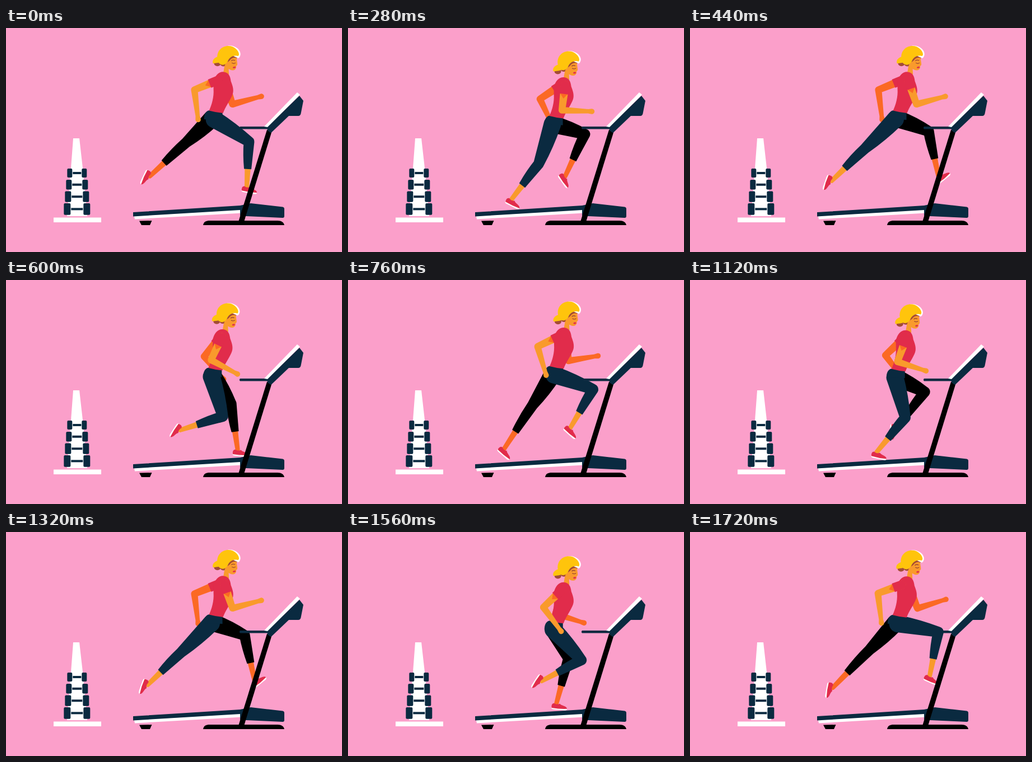
Write an HTML page that moves like this. It is 600x400 px and loops after 1760 ms.

```html
<!DOCTYPE html>
<html lang="en">
<head>
<meta charset="utf-8">
<title>Treadmill run</title>
<style>
  html, body { margin: 0; width: 100%; height: 100%; overflow: hidden; background: #fb9fca; }
  svg { display: block; width: 100vw; height: 100vh; }
  .navy { fill: #0a2a40; }
  .white { fill: #fff; }
  .red { fill: #e12c4b; }
  .near { fill: #f99a2c; }
  .far { fill: #fb6924; }
  .hair { fill: #ffc40c; }
  .shade { fill: #a34c35; }
  .line { fill: none; stroke: #8a3a30; stroke-width: 1.1; stroke-linecap: round; }
</style>
</head>
<body>
<svg viewBox="0 0 600 400">
  <defs>
    <g id="shoe">
      <path class="white" d="M-8 7L18 7C21 9 19 11.500 15 11.500L-4 11C-8 11-9 9-8 7Z"/>
      <path class="red" d="M-8 8.500C-9 4-8 0-4 0C-1 2 3 2 6 0C9 4 19 3 19.500 8.500Q6 10-8 8.500Z"/>
    </g>
  </defs>

  <g id="rack">
    <path class="white" d="M120 197H131L137 250L145 336H109L116 250Z"/>
    <path class="white" d="M85 338.500H170V347H85Z"/>
  </g>

  <path d="M238 344.500L260.500 344L257 352H242Z"/>
  <path class="white" d="M229 336L420 324V330.500L230 341.500Z"/>
  <path class="navy" d="M227 329L418 317L437 313L494 319.500Q497 320 497 323V336Q497 339 494 339L418 335.500V325L227 336.500Z"/>
  <path d="M352 352C353 346 357 344 364 344H485C492 344 496 347 497 352Z"/>

  <g id="farArm"></g>
  <g id="farLeg"></g>
  <g id="nearLeg"></g>
  <g id="body">
    <path class="navy" d="M354 164C354 154 358 148 365 148L387 151V165Z"/>
    <path class="near" d="M392 48H413C411 56 414 62 413.500 67L411.500 69C412 73 410 76 406 76.500C402 77 400 75 398 74L398.500 84H388L391 66Z"/>
    <path class="shade" d="M414 49C404 48 398 53 396 62L400 59C403 54 409 53 413 55Z"/>
    <path class="line" d="M403 59.500Q406 57.500 409 59M404 63.500Q407 65.500 410 63.500"/>
    <ellipse class="red" cx="408" cy="71.500" rx="2.600" ry="1.500" transform="rotate(-12 408 71.500)"/>
    <path class="shade" d="M383 60H393L391 69Q386 71 383 66Z"/>
    <g id="bun">
      <ellipse class="shade" cx="378" cy="66" rx="6" ry="5"/>
      <path class="hair" d="M370 66C368 60 373 55 379 54L387 60C386 65 378 65 370 66Z"/>
    </g>
    <path class="white" d="M396 33C409 31 420 40 419 49Q418 54 415 55L400 48Z"/>
    <path class="hair" d="M378 56C376 43 385 33 398 33C408 33 416 41 416.500 48Q416 52 414 51C405 49 399 54 396 61C393 66 388 68 384 66C380 64 378 61 378 56Z"/>
    <path class="red" d="M371 97C374 86 380 79 389 79.500C397 80 401 86 402 96C406 106 408 114 404 122C399 133 392 142 388 153Q376 152 363 148.500C368 138 372 124 371 110Z"/>
  </g>
  <g id="nearArm"></g>

  <path d="M466 182H475.500L425 346H415Z"/>
  <path class="navy" d="M418 176H470V180.500H418Q416 178 418 176Z"/>
  <path class="navy" d="M466 177L524 121L531 130L526.500 153Q525.500 157 522 157H505L473 187.500L467 183Z"/>
  <path class="white" d="M461 176L520 115L525 119L467 177Z"/>
</svg>
<script>
const STRIDE = 880, TICK = 40;

// The ankle's way through one stride: time, x, y, foot angle.
const anklePath = [
  [0, 430, 283, 8], [40, 425, 302, 4], [110, 414, 303, 4], [205, 372, 306, 4],
  [280, 292, 306, 25], [440, 253, 273, 108], [515, 274, 255, 115], [600, 311, 268, 122],
  [680, 346, 266, 122], [760, 397, 264, 40], [840, 428, 257, 22], [852, 445, 267, -45]
];

const byId = id => document.getElementById(id);
const mix = (a, b, k) => [a[0] + (b[0] - a[0]) * k, a[1] + (b[1] - a[1]) * k];
const wave = (time, period = STRIDE) => Math.cos(2 * Math.PI * time / period);

function add(parent, tag, attrs) {
  const el = document.createElementNS("http://www.w3.org/2000/svg", tag);
  for (const name in attrs) el.setAttribute(name, attrs[name]);
  return parent.appendChild(el);
}

// Smooth periodic curve through the keys.
function sample(keys, time) {
  const t = (time % STRIDE + STRIDE) % STRIDE, n = keys.length;
  const at = i => {
    const lap = Math.floor(i / n), key = keys[i - lap * n];
    return [key[0] + lap * STRIDE, ...key.slice(1)];
  };
  const i = keys.filter(key => key[0] <= t).length - 1;
  const [a, b, c, d] = [-1, 0, 1, 2].map(k => at(i + k));
  const span = c[0] - b[0], u = (t - b[0]) / span;
  return b.slice(1).map((p, j) => {
    const q = c[j + 1];
    const m0 = (q - a[j + 1]) / (c[0] - a[0]) * span;
    const m1 = (d[j + 1] - p) / (d[0] - b[0]) * span;
    return p + u * m0 + u * u * (3 * (q - p) - 2 * m0 - m1) + u * u * u * (2 * (p - q) + m0 + m1);
  });
}

// Knee or elbow between two ends; bend is 1 for forward, -1 for backward.
function joint(from, to, upper, lower, bend) {
  const dx = to[0] - from[0], dy = to[1] - from[1], dist = Math.hypot(dx, dy);
  const stretch = Math.max(1, dist / (upper + lower));
  const a = upper * stretch, b = lower * stretch;
  const along = (a * a - b * b + dist * dist) / (2 * dist);
  const out = bend * Math.sqrt(Math.max(0, a * a - along * along));
  return [from[0] + (dx * along + dy * out) / dist, from[1] + (dy * along - dx * out) / dist];
}

// Limb segment from radius ra at a to rb at b, its back and front swelling midway.
function taper(a, b, ra, rb, { flat = false, back = 0, front = 0 } = {}) {
  const len = Math.hypot(b[0] - a[0], b[1] - a[1]) || 1;
  const nx = (a[1] - b[1]) / len, ny = (b[0] - a[0]) / len;
  const side = (p, r) => `${(p[0] + nx * r).toFixed(2)} ${(p[1] + ny * r).toFixed(2)}`;
  const middle = mix(a, b, .5), rm = (ra + rb) / 2;
  const cap = flat ? "L" : `A${rb} ${rb} 0 0 0 `;
  return `M${side(a, ra)}Q${side(middle, rm + back)} ${side(b, rb)}${cap}${side(b, -rb)}`
    + `Q${side(middle, -rm - front)} ${side(a, -ra)}A${ra} ${ra} 0 0 0 ${side(a, ra)}Z`;
}

function makeLeg(id, skin, pants, thigh, shin) {
  const group = byId(id);
  const calf = add(group, "path", { class: skin });
  const shoe = add(group, "use", { href: "#shoe" });
  const cloth = add(group, "path", { class: pants });
  return (time, bodyX, bodyY) => {
    const [x, y, angle] = sample(anklePath, time);
    const ankle = [x, y], hip = [370 + bodyX + (x - 355) * .03, 164 + bodyY];
    const knee = joint(hip, ankle, thigh, shin, 1), cuff = mix(knee, ankle, .61);
    calf.setAttribute("d", taper(cuff, ankle, 5.200, 4));
    cloth.setAttribute("d", taper(hip, knee, 15.500, 9.500, { front: 3 })
      + taper(knee, cuff, 9.500, 6.500, { flat: true, back: 2 }));
    shoe.setAttribute("transform", `translate(${x} ${y}) rotate(${angle})`);
  };
}

function makeArm(id, skin) {
  const group = byId(id);
  const arm = add(group, "path", { class: skin });
  const shadow = add(group, "path", { class: "far" });
  const sleeve = add(group, "path", { class: "red" });
  return (time, bodyY) => {
    const swing = wave(time + 30);
    const shoulder = [384 - 6 * swing, 94.500 + bodyY * .9];
    const wrist = [396 - 55 * swing, 154.500 + 17 * swing - 15.500 * wave(time + 30, STRIDE / 2)];
    const elbow = joint(shoulder, wrist, 45, 47, -1);
    const hem = mix(shoulder, elbow, .35);
    arm.setAttribute("d", taper(shoulder, elbow, 7.500, 6) + taper(elbow, wrist, 6, 3.800)
      + taper(wrist, mix(elbow, wrist, 1.140), 3.800, 4.800));
    shadow.setAttribute("d", taper(hem, mix(shoulder, elbow, .52), 6.500, .5));
    sleeve.setAttribute("d", taper(shoulder, hem, 8, 8, { flat: true }));
  };
}

for (let i = 0; i < 4; i++) {
  const y = 251 + 19.600 * i + .35 * i * i, height = 16 + 1.600 * i;
  const width = 9 + i, reach = 17.500 + 2 * i, inner = reach - width - 1, middle = 126.800;
  const bar = attrs => add(byId("rack"), "rect", { class: "navy", ...attrs });
  bar({ x: middle - reach, y, width, height, rx: 2 });
  bar({ x: middle + reach - width, y, width, height, rx: 2 });
  bar({ x: middle - inner, y: y + height / 2 - 2, width: inner * 2, height: 4 });
}

const nearLeg = makeLeg("nearLeg", "near", "navy", 74, 80);
const farLeg = makeLeg("farLeg", "far", "black", 58, 83);
const nearArm = makeArm("nearArm", "near");
const farArm = makeArm("farArm", "far");

function draw(now) {
  const time = Math.floor(now / TICK) * TICK, half = STRIDE / 2;
  const x = 1.700 * wave(time - 50, half) - 1.700;
  const y = 4.700 - 5.800 * wave(time, half);
  byId("body").setAttribute("transform", `translate(${x} ${y})`);
  byId("bun").setAttribute("transform", `translate(0 ${-2 - 3 * wave(time - 70, half) + 2})`);
  nearLeg(time, x, y);
  // The far leg lingers on the belt and hurries through the air.
  const opposite = time + half;
  farLeg(opposite - 50 * wave(opposite - 130), x, y);
  nearArm(time, y);
  farArm(opposite, y);
  requestAnimationFrame(draw);
}
requestAnimationFrame(draw);
</script>
</body>
</html>
```
